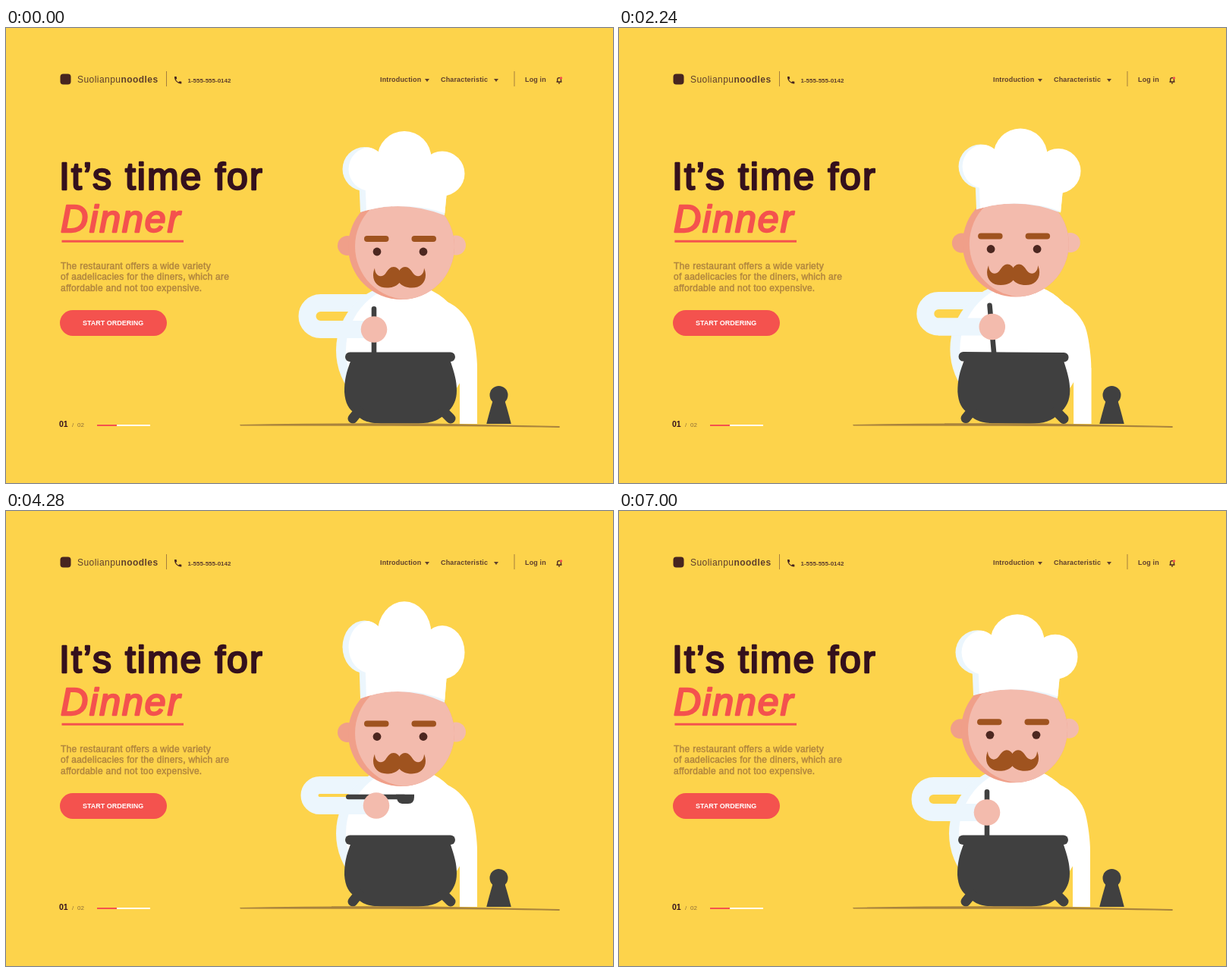
An HTML page that plays this animation: 800x600 px, repeating every 7.04 s.

```html
<!DOCTYPE html>
<html lang="en">
<head>
<meta charset="utf-8">
<title>Dinner</title>
<style>
html, body { margin: 0; width: 100%; height: 100%; overflow: hidden; background: #fdd34b; }
svg { display: block; width: 800px; height: 600px; font-family: "Liberation Sans", Arial, sans-serif; }
.title { font-size: 50px; stroke-width: 2.4; stroke-linejoin: round; }
.copy { font-size: 12px; letter-spacing: .28px; fill: #b2873f; stroke: #b2873f; stroke-width: .5; }
.nav { font-size: 9px; font-weight: bold; letter-spacing: .15px; fill: #5f3f2c; }
.nav .phone { font-size: 8px; letter-spacing: 0; }
.brand { font-size: 12px; letter-spacing: .45px; fill: #5f3f2c; }
.page { font-size: 8px; fill: #8f6d38; }
.dark { fill: #404040; }
.blue { fill: #ecf6fd; }
.white { fill: #fff; }
.skin { fill: #f3bbad; }
.shade { fill: #f09f89; }
.hair { fill: #9f531f; }
.sleeve { fill: none; stroke-width: 23; }
</style>
</head>
<body>
<svg viewBox="0 0 800 600">
  <defs>
    <clipPath id="stage"><rect width="800" height="522"/></clipPath>
    <ellipse id="torso" rx="87" ry="88"/>
    <clipPath id="torsoClip"><use href="#torso"/></clipPath>
    <circle id="skull" cx="521" cy="288" r="70"/>
    <clipPath id="skullClip"><use href="#skull"/></clipPath>
    <circle id="puff" cx="472.5" cy="186" r="29"/>
    <path id="band"/>
    <clipPath id="hatClip"><use href="#puff"/><use href="#band"/></clipPath>
  </defs>

  <rect width="800" height="600" fill="#fdd34b"/>

  <rect x="71.500" y="60.500" width="14" height="14" rx="4" fill="#472520"/>
  <text class="brand" x="94" y="72">Suolianpu<tspan font-weight="bold">noodles</tspan></text>
  <path d="M211.500 57V77M670 57V77" stroke="#a57f3d"/>
  <path transform="translate(220.400 62.500) scale(.52)" fill="#472520" d="M6.600 10.800c1.400 2.800 3.800 5.100 6.600 6.600l2.200-2.200c.3-.3.7-.4 1-.2 1.100.4 2.300.6 3.600.6.6 0 1 .4 1 1V20c0 .6-.4 1-1 1C10.600 21 3 13.400 3 4c0-.6.4-1 1-1h3.500c.6 0 1 .4 1 1 0 1.300.2 2.500.6 3.600.1.400 0 .7-.2 1z"/>
  <g class="nav">
    <text class="phone" x="239.500" y="72">1-555-555-0142</text>
    <text x="493" y="71">Introduction</text>
    <text x="573" y="71">Characteristic</text>
    <text x="684" y="71">Log in</text>
    <path d="M552 67h6l-3 4zM643 67h6l-3 4z"/>
  </g>
  <path d="M725.500 71h7M726.700 71V68a2.400 2.400 0 0 1 4.800 0V71M728 72.800h2" fill="none" stroke="#472520" stroke-width="1.300"/>
  <circle cx="731.500" cy="66" r="1.700" fill="#f4524e"/>

  <text class="title" x="70" y="213" letter-spacing="2" fill="#35111d" stroke="#35111d">It’s time for</text>
  <text class="title" x="72" y="269" letter-spacing="2" font-style="italic" fill="#f4524e" stroke="#f4524e">Dinner</text>
  <path d="M73.500 281.300H234" stroke="#f4524e" stroke-width="3"/>
  <g class="copy">
    <text x="72" y="318">The restaurant offers a wide variety</text>
    <text x="72" y="332">of aadelicacies for the diners, which are</text>
    <text x="72" y="346.500">affordable and not too expensive.</text>
  </g>
  <rect x="71" y="372" width="141" height="34" rx="17" fill="#f4524e"/>
  <text x="101" y="392.300" font-size="9" font-weight="bold" fill="#fff">START ORDERING</text>

  <text x="70" y="526" font-size="10.500" font-weight="bold" fill="#35111d">01</text>
  <text class="page" x="87" y="526">/</text>
  <text class="page" x="94" y="526">02</text>
  <path d="M146 524h44" stroke="#fff" stroke-width="2"/>
  <path d="M120 524h26" stroke="#f4524e" stroke-width="2"/>

  <g clip-path="url(#stage)">
    <path id="armL" class="sleeve" stroke="#ecf6fd"/>
    <g id="body">
      <use href="#torso" class="blue"/>
      <g clip-path="url(#torsoClip)"><use href="#torso" x="13" class="white"/></g>
    </g>
    <path id="armR" class="sleeve" stroke="#fff"/>

    <g id="head">
      <circle class="shade" cx="450" cy="287" r="13"/>
      <circle class="skin" cx="593" cy="286.500" r="13"/>
      <use href="#skull" class="shade"/>
      <g clip-path="url(#skullClip)"><circle class="skin" cx="530" cy="288" r="70"/></g>
      <g id="face">
        <g id="eyes" fill="#4c2720"><circle cx="489" cy="295" r="5.400"/><circle cx="550" cy="295" r="5.400"/></g>
        <rect id="browL" class="hair" x="472" y="274" width="32.500" height="8" rx="4"/>
        <rect id="browR" class="hair" x="534.500" y="274" width="32.500" height="8" rx="4"/>
        <path id="mustache" class="hair" d="M486 316.500C486 326 494 331 500 324C504 318 507 315 511 315C515 315 518 318.500 518.500 320C519 318.500 522 315 526 315C530 315 533 318 537 324C543 331 551 326 551 316.500C557 331 549 342.500 535 342.500C527 342.500 522 340 518.500 336C515 340 510 342.500 502 342.500C488 342.500 480 331 486 316.500Z"/>
      </g>
      <g id="hat">
        <use href="#puff" class="blue"/>
        <use href="#band" class="blue"/>
        <g clip-path="url(#hatClip)"><g id="shine" class="white"><use href="#puff"/><use href="#band"/></g></g>
        <circle class="white" cx="525" cy="171.500" r="35.500"/>
        <circle class="white" cx="575" cy="192" r="29.500"/>
      </g>
    </g>

    <path id="foreL" class="sleeve" stroke="#ecf6fd"/>
    <g id="spoon" class="dark">
      <rect x="-40" y="-3.300" width="80" height="6.600" rx="3.300"/>
      <path d="M26-3.300H50V0Q50 9 42 9H34Q27 9 26-3.300Z"/>
    </g>
    <circle id="handL" class="skin" r="17.300"/>

    <g id="pot" class="dark">
      <rect x="447" y="427.500" width="145" height="12.500" rx="6.200"/>
      <path d="M455 437C448 455 446 465 446 480C447 495 452 503 460 508C470 521 485 521.500 500 521.500H540C560 521.500 570 518 580 508C590 500 594 490 594 478C594 465 591 455 585 437Z"/>
      <path d="M465 505L457 515M576 505L586 515" stroke="#404040" stroke-width="13" stroke-linecap="round"/>
    </g>
    <g id="shaker" class="dark">
      <circle cy="-13" r="12"/>
      <path d="M-8-5H8Q12 8 16.500 26H-16.500Q-12 8-8-5Z"/>
    </g>
    <path id="foreR" class="sleeve" stroke="#fff"/>
    <g id="handR" class="shade">
      <circle r="17"/>
      <ellipse cx="-22" cy="-7" rx="12" ry="4.500" transform="rotate(10 -22 -7)"/>
    </g>
  </g>

  <path d="M308 523Q420 520.500 560 521.500L729 525Q731 526 729 527Q640 525.300 500 524.800L309 524.500Z" fill="#a9833c"/>
</svg>

<script>
const LOOP = 7040, STIR = 960, STIR_END = 2160;
const el = {};
document.querySelectorAll('[id]').forEach(e => el[e.id] = e);

const part = (t, a, b) => Math.min(1, Math.max(0, (t - a) / (b - a)));
const ease = (t, a, b) => { const k = part(t, a, b); return k * k * (3 - 2 * k); };
const pulse = (t, a, b, c, d) => ease(t, a, b) - ease(t, c, d);
const hump = (t, a, b) => Math.sin(Math.PI * part(t, a, b)) ** 2;
const wave = (t, period) => Math.sin(2 * Math.PI * t / period);
const mix = (a, b, k) => a.map((v, i) => Array.isArray(v) ? mix(v, b[i], k) : v + (b[i] - v) * k);

// arm poses: shoulder, two elbow corners, hand
const fold = ([x, y], gap) => {
  const tip = x - 99.5 + 11.5;
  return [[490, y - gap], [tip, y - gap], [tip, y], [x, y]];
};
const plant = [[485, 415], [422, 412], [377, 450], [374, 517]];
const hang = [[565, 367], [598, 380], [609.5, 425], [609.5, 545]];
const reach = [[575, 390], [690, 400], [715, 440], [664, 486]];
const raise = [[565, 420], [646.5, 420], [646.5, 391.5], [545, 386]];

// push the arm sideways, more towards the hand
const flare = (arm, dx) => arm.map(([x, y], i) => [x + dx * i / 3, y]);
const shift = (arm, dx, dy = 0) => arm.map(([x, y], i) => [x + dx, i > 1 ? y + dy : y]);

const toward = (a, b, dist) => mix(a, b, Math.min(1, dist / Math.hypot(b[0] - a[0], b[1] - a[1])));
const bend = (from, corner, to, r) => {
  const a = toward(corner, from, r), b = toward(corner, to, r);
  return `L${a}C${mix(a, corner, .55)} ${mix(b, corner, .55)} ${b}`;
};

function drawArm(side, [s, k1, k2, h]) {
  const r = Math.hypot(k2[0] - k1[0], k2[1] - k1[1]) / 2;
  el['arm' + side].setAttribute('d', `M${s}${bend(s, k1, k2, r)}${bend(k1, k2, h, r)}L${h}`);
  el['fore' + side].setAttribute('d', `M${toward(k2, h, r)}L${h}`);
  move(el['hand' + side], h);
}

const move = (e, [x, y], turn = 0, scale = 1) =>
  e.setAttribute('transform', `translate(${x} ${y}) rotate(${turn}) scale(1 ${scale})`);
const spin = (e, y, turn, cx) => e.setAttribute('transform', `translate(0 ${y}) rotate(${turn} ${cx} 278)`);

function draw(t) {
  // acting beats, each from 0 to 1
  const s = (1 - ease(t, STIR_END, 2400)) * (1 - Math.cos(2 * Math.PI * Math.min(t, STIR_END) / STIR)) / 2;
  const lifted = pulse(t, STIR_END, 2720, 5360, 5540);
  const sip = pulse(t, 2300, 2740, 2960, 3400);
  const savour = pulse(t, 3300, 3560, 5320, 5480);
  const delight = pulse(t, 3620, 3900, 4280, 4480);
  const frown = pulse(t, 4720, 5040, 6200, 6700);
  const duck = pulse(t, 5460, 5780, 6140, LOOP);
  const lean = pulse(t, 5360, 5740, 6200, 6860);
  const dropped = pulse(t, 5360, 5540, 6500, 6860);
  const grab = pulse(t, 5330, 5560, 6760, 6990);
  const season = pulse(t, 5600, 5780, 6140, 6560);
  const sway = 10 * s * s;

  // left arm and spoon
  const grip = [485 + 18 * s + 3 * lifted, 397.5 - 8 * s - 9 * lifted + 10 * sip];
  const folded = fold(grip, 35 - 8 * lifted).map((p, i) => i % 3 ? [p[0] + 17.5 - 4 * lifted - 17.5 + 4 * lifted, p[1]] : p);
  const swing = hump(t, 5360, 5740) + .85 * hump(t, 6200, 6860);
  drawArm('L', flare(mix(folded, plant, lean), -130 * swing));
  const held = [grip[0], grip[1] + 9.5 - 21 * lifted];
  move(el.spoon, mix(held, [483.5, 442], dropped), 90 - 90 * lifted - 15 * dropped);

  // right arm and shaker
  const jolt = 4 * season ** 4 * wave(t - 5880, 160);
  const tuck = -3 * pulse(t, 4800, 5160, 5330, 5400);
  const out = 60 * hump(t, 5330, 5640);
  const right = mix(mix(shift(hang, sway + tuck), reach, grab), raise, season);
  drawArm('R', shift(flare(right, out), 0, jolt));
  const shaker = mix([649.5, 497], [525, 394], season);
  move(el.shaker, [shaker[0], shaker[1] + jolt], -100 * season);

  // body and head
  move(el.body, [522 + sway, 425 - 4 * s + 3 * sip + 48 * duck], 0, 1 - .2 * duck);
  const hop = 9 * hump(t, 3200, 3480) + 12 * hump(t, 5340, 5620);
  move(el.head, [5 * s, 25 * sip + 5 * savour + 63.5 * duck - 9.5 * s - hop]);
  move(el.face, [-2 * s, 10 * sip - 2.5 * savour]);
  const stretch = 1 + .2 * delight;
  move(el.hat, [6 * s, 245 * (1 - stretch)], 0, stretch);
  move(el.shine, [8 - 8 * s, 0]);
  el.band.setAttribute('d', `M480 170L465 195L467 243Q522 ${225 + 54 * sip} 578 247L583 195V170Z`);

  // expression
  move(el.eyes, [6 * frown - 9 * duck, 5.5 * frown + 2.5 * duck]);
  spin(el.browL, 14.5 * frown + 2.5 * duck, 5 * frown, 488);
  spin(el.browR, 2.5 * (frown + duck), 18 * frown, 551);
  move(el.mustache, [0, 1.5 * delight * wave(t - 3640, 280)]);
  el.pot.setAttribute('transform', `rotate(${s} 520 522)`);
}

const start = performance.now();
function tick() {
  draw((performance.now() - start) % LOOP);
  requestAnimationFrame(tick);
}
draw(0);
requestAnimationFrame(tick);
</script>
</body>
</html>
```
